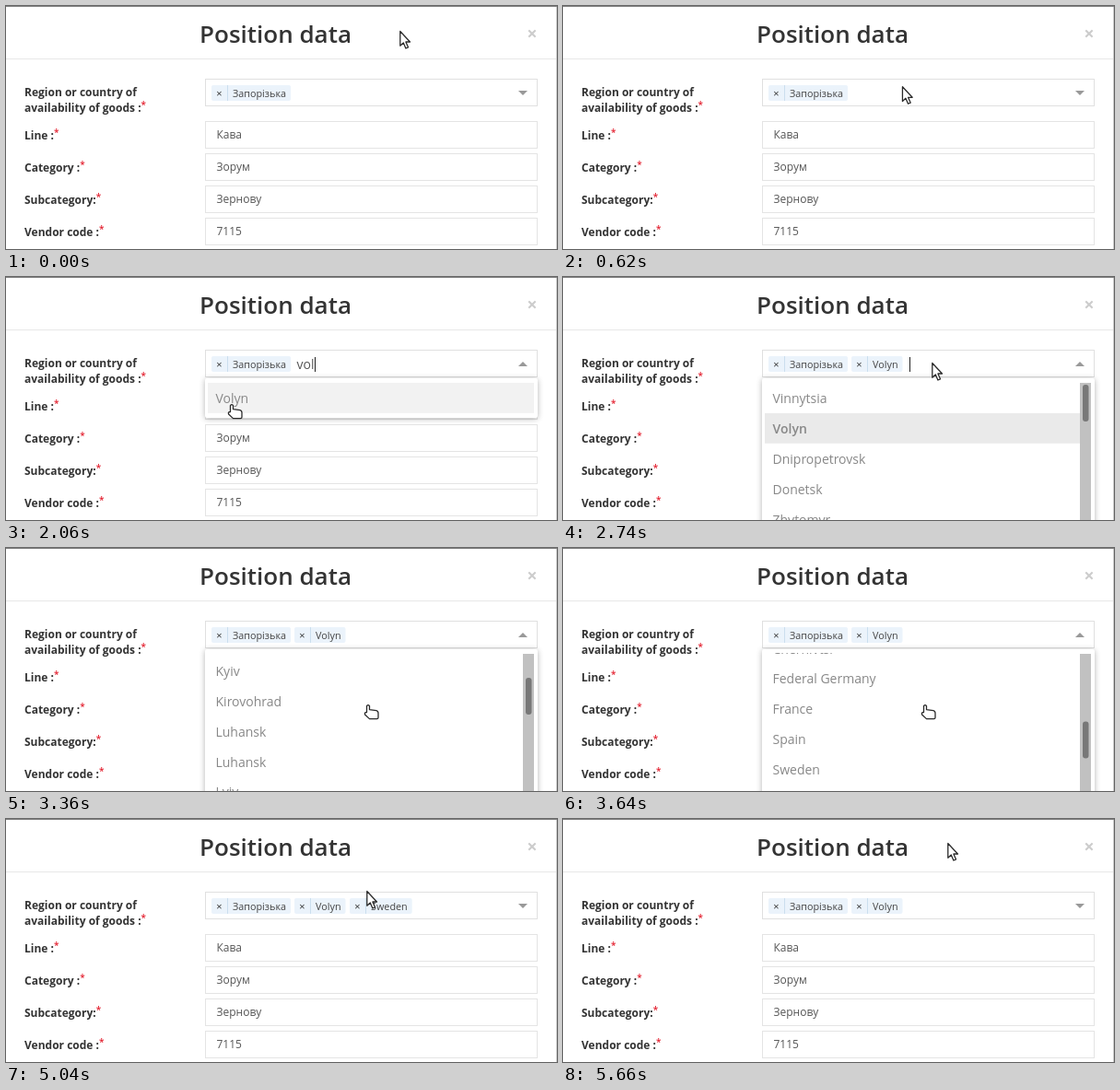
Recreate the animation shown at these times as an HTML page with a canvas. Size 598 by 264 pixels, loop 6000 ms.

```html
<!DOCTYPE html>
<html lang="en">
<head>
<meta charset="utf-8">
<title>Position data</title>
<style>
  html, body { margin: 0; width: 100%; height: 100%; overflow: hidden; background: #fff; }
  canvas { display: block; width: 598px; height: 264px; }
</style>
</head>
<body>
<canvas id="stage"></canvas>
<script>
const W = 598, H = 264, LOOP = 6000, ROW = 32.9, TOP = 115;
const canvas = document.getElementById('stage');
const ctx = canvas.getContext('2d');
const dpr = window.devicePixelRatio || 1;
canvas.width = W * dpr;
canvas.height = H * dpr;

const REGIONS = ('Vinnytsia,Volyn,Dnipropetrovsk,Donetsk,Zhytomyr,Zakarpattia,Zaporizhzhia,' +
  'Ivano-Frankivsk,Kyiv,Kirovohrad,Luhansk,Luhansk,Lviv,Mykolaiv,Odesa,Poltava,Rivne,Sumy,' +
  'Ternopil,Kharkiv,Kherson,Khmelnytskyi,Cherkasy,Chernivtsi,Federal Germany,France,Spain,' +
  'Sweden,Norway,Finland,Denmark').split(',');

const FIELDS = [['Line :', 'Кава'], ['Category :', 'Зорум'], ['Subcategory:', 'Зернову'], ['Vendor code :', '7115']];

// [time, x, y]
const POINTER = [
  [120, 428, 27], [720, 364, 92], [1760, 364, 92], [2060, 245, 138], [2380, 245, 138],
  [2680, 401, 93], [3060, 401, 93], [3260, 393, 170], [3680, 393, 170], [4050, 274, 206],
  [4350, 274, 206], [4520, 238, 222], [4860, 438, 30], [4970, 434, 46], [5040, 392, 78],
  [5210, 381, 93], [5380, 381, 93], [5560, 436, 50], [5660, 418, 26]
];
// [time, offset]
const SCROLL = [[3200, 0], [3360, 259.5], [3660, 814.3]];

const linear = u => u;
const smooth = u => u * u * (3 - 2 * u);

function track(keys, t, ease) {
  if (t <= keys[0][0]) return keys[0].slice(1);
  for (let i = 1; i < keys.length; i++) {
    const a = keys[i - 1], b = keys[i];
    if (t < b[0]) {
      const u = ease((t - a[0]) / (b[0] - a[0]));
      return a.slice(1).map((v, k) => v + (b[k + 1] - v) * u);
    }
  }
  return keys[keys.length - 1].slice(1);
}

function stateAt(t) {
  const [x, y] = track(POINTER, t, smooth);
  const tags = [['Запорізька', 223]];
  if (t >= 2240) tags.push(['Volyn', 313]);
  if (t >= 4160 && t < 5380) tags.push(['Sweden', 373]);
  const query = t >= 2240 || t < 1280 ? '' : t < 1340 ? 'v' : t < 1480 ? 'vo' : 'vol';
  return {
    t, x, y, tags, query,
    open: (t >= 860 && t < 2240) || (t >= 2700 && t < 4160),
    caret: (t >= 700 && t < 1000) || (t >= 1120 && t < 2240) || (t >= 2700 && t < 2780) || (t >= 3680 && t < 4160),
    scroll: t < 2240 ? 0 : track(SCROLL, t, linear)[0]
  };
}

function rect(x, y, w, h, color) {
  ctx.fillStyle = color;
  ctx.fillRect(x, y, w, h);
}

function frame(x, y, w, h, color) {
  ctx.strokeStyle = color;
  ctx.lineWidth = 1;
  ctx.strokeRect(x + 0.5, y + 0.5, w - 1, h - 1);
}

function pill(x, y, w, h, r, color) {
  ctx.fillStyle = color;
  ctx.beginPath();
  ctx.roundRect(x, y, w, h, r);
  ctx.fill();
}

function text(str, x, y, size, color, weight = 400, align = 'left') {
  ctx.font = `${weight} ${size}px "Open Sans", sans-serif`;
  ctx.textAlign = align;
  ctx.fillStyle = color;
  ctx.fillText(str, x, y);
  return ctx.measureText(str).width;
}

function label(str, y, required = true) {
  const w = text(str, 20, y, 12, '#333', 700);
  if (required) text('*', 20 + w, y - 4, 10, '#e3202f', 600);
}

function drawForm() {
  rect(0, 0, W, H, '#fff');
  rect(0, 0, W, 1, '#858585');
  rect(W - 1, 1, 1, H, '#c9c9c9');
  text('Position data', 292.5, 40, 26, '#333', 600, 'center');
  text('×', 571, 37, 20, '#ccc', 700, 'center');
  rect(0, 57, W - 1, 1, '#e8e8e8');

  label('Region or country of', 98, false);
  label('availability of goods :', 115);
  FIELDS.forEach(([name, value], i) => {
    const y = 125 + i * 35;
    label(name, y + 20);
    frame(216, y, 361, 30, '#e4e4e4');
    text(value, 228.5, y + 19, 12, '#555');
  });
}

function drawTag([name, x]) {
  ctx.font = '400 10.8px "Open Sans", sans-serif';
  const w = 28 + ctx.measureText(name).width;
  pill(x, 86, w, 17, 2, '#ebf3fb');
  rect(x + 17, 86, 1, 17, '#cbdeee');
  text('×', x + 8.5, 98.5, 11, '#333', 400, 'center');
  text(name, x + 23, 98.5, 10.8, '#444');
}

function drawControl(s) {
  frame(216, 79, 361, 30, '#e0e0e0');
  s.tags.forEach(drawTag);
  const x = s.tags.length > 1 ? 376 : 315.5;
  const w = s.query ? text(s.query, x, 99.5, 14, '#555') : 0;
  if (s.caret) rect(Math.round(x + w), 87, 1, 16, '#222');

  const dir = s.open ? -1 : 1;
  ctx.fillStyle = '#999';
  ctx.beginPath();
  ctx.moveTo(556, 94.5 - 2.5 * dir);
  ctx.lineTo(566, 94.5 - 2.5 * dir);
  ctx.lineTo(561, 94.5 + 2.5 * dir);
  ctx.fill();
}

function focusedRow(s) {
  if (s.t < 2240) return 0;
  if (s.t < 3680) return 1;
  return Math.floor((s.y - TOP + s.scroll) / ROW);
}

function drawMenu(s) {
  const items = REGIONS.filter(r => r.toLowerCase().includes(s.query));
  const long = items.length > 4;
  const bottom = long ? H + 20 : TOP + items.length * ROW + 5;
  ctx.save();
  ctx.shadowColor = 'rgba(0,0,0,.3)';
  ctx.shadowBlur = 6 * dpr;
  ctx.shadowOffsetY = dpr;
  pill(216, 110, 361, bottom - 110, 2, '#fff');
  ctx.restore();

  const right = long ? 561 : 573;
  ctx.save();
  ctx.beginPath();
  ctx.rect(218, TOP - 1, right - 218, bottom - TOP);
  ctx.clip();
  const focus = focusedRow(s);
  items.forEach((name, i) => {
    const y = TOP + i * ROW - s.scroll;
    if (y < TOP - ROW || y > H) return;
    const chosen = name === 'Volyn' && s.t >= 2240;
    if (chosen || i === focus) rect(219, y, right - 219, ROW, chosen ? '#eaeaea' : '#f2f2f2');
    text(name, 227.5, y + 22, 14, '#888', chosen ? 600 : 400);
  });
  ctx.restore();

  if (long) {
    rect(561, TOP, 12, H, '#c1c1c1');
    pill(564, 117 + s.scroll * 0.0918, 6.5, s.query ? 69 : 40, 3, '#787878');
  }
}

function shape(path, x, y) {
  ctx.save();
  ctx.translate(x, y);
  ctx.lineJoin = 'round';
  ctx.lineWidth = 1.3;
  ctx.fillStyle = '#fff';
  ctx.strokeStyle = '#2a2a2a';
  ctx.fill(path);
  ctx.stroke(path);
  ctx.restore();
}

const ARROW = new Path2D('M.5 .5V16.2L4 13 6.6 19 9.2 17.8 6.6 12H11.2Z');
const HAND = new Path2D('M2.5 1.6Q4-.4 5.5 1.6V5.6L13 6.6Q15 7 15 9.5V14.2Q15 15.6 13.5 15.6H5.5L.6 11Q-.4 8.5 2.5 8.5Z');

function drawPointer(s) {
  const { x, y } = s;
  const overOption = s.open && y > 112;
  const overCross = s.tags.length > 2 && s.t > 5120 && Math.abs(x - 381) < 8 && y > 86 && y < 103;
  const overField = !s.open && x > 216 && x < 577 && y > 125 && (y - 125) % 35 < 30;
  if (overOption || overCross) {
    shape(HAND, x - 4, y);
  } else if (overField) {
    rect(x - 0.5, y - 8, 1.2, 16, '#222');
    rect(x - 3, y - 8, 6, 1, '#222');
    rect(x - 3, y + 7, 6, 1, '#222');
  } else {
    shape(ARROW, x - 0.7, y);
  }
}

function draw(t) {
  const s = stateAt(t);
  ctx.setTransform(dpr, 0, 0, dpr, 0, 0);
  drawForm();
  drawControl(s);
  if (s.open) drawMenu(s);
  drawPointer(s);
}

const start = performance.now();
function tick() {
  draw((performance.now() - start) % LOOP);
  requestAnimationFrame(tick);
}
tick();
</script>
</body>
</html>
```
